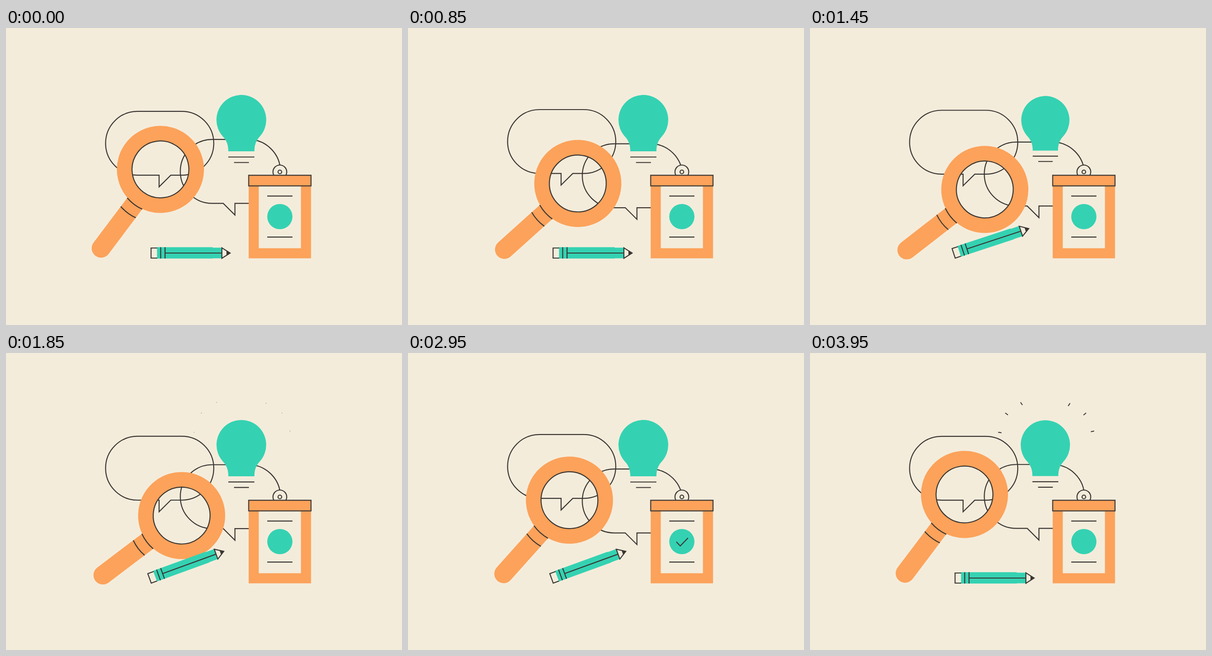
Recreate the animation shown at these times as an HTML page. Size 864 by 648 pixels, loop 4000 ms.

```html
<!DOCTYPE html>
<html lang="en">
<head>
<meta charset="utf-8">
<title>Research tools</title>
<style>
  html, body { margin: 0; width: 100%; height: 100%; overflow: hidden; background: #f4ecdb; }
  svg { display: block; width: 864px; height: 648px; }
  .line { fill: none; stroke: #3a3633; stroke-width: 2.2; }
  .ink { fill: #3a3633; }
  .paper { fill: #f4ecdb; }
  .orange { fill: #fca25a; }
  .teal { fill: #34d2b2; }
</style>
</head>
<body>
<svg viewBox="0 0 864 648">
  <rect class="paper" width="864" height="648"/>

  <path id="bubbleLeft" class="line" d="M287 181.8H383.6A69.7 69.7 0 0 1 383.6 321.2H359.5L334 346.5V321.2H287A69.7 69.7 0 0 1 287 181.8Z"/>
  <path id="bubbleRight" class="line" d="M450 243.2H529A69.7 69.7 0 0 1 529 382.6H499.5V408L474 382.6H450A69.7 69.7 0 0 1 450 243.2Z"/>

  <g id="bulb">
    <path class="teal" d="M473 236.5A54.3 54.3 0 1 1 554 236.5C546 245 542 254 542 269H485C485 254 481 245 473 236.5Z"/>
    <path class="line" d="M485 281.5H542M497.5 293.5H530"/>
  </g>
  <g id="rays"></g>

  <g id="clipboard">
    <rect class="orange" x="529.5" y="335" width="136" height="167.5"/>
    <rect class="paper" x="551.5" y="340" width="92" height="140.5"/>
    <circle class="line" cx="597.5" cy="314" r="15" style="fill:#f4ecdb"/>
    <circle class="line" cx="597.5" cy="314" r="4"/>
    <rect class="line" x="529.5" y="321.3" width="136" height="23.2" style="fill:#fca25a"/>
    <path class="line" d="M570 366.6H625M570 456.2H625"/>
    <circle class="teal" cx="597.5" cy="411.5" r="27.5"/>
    <path id="check" class="line" pathLength="1" d="M585.5 412L594 421L611 403.5"/>
  </g>

  <!-- Local x axis runs from the pivot along the handle to the lens. -->
  <g id="magnifier">
    <path class="orange" d="M20 -20.5H146V20.5H20A20.5 20.5 0 0 1 20 -20.5Z"/>
    <circle cx="235.4" r="78.5" fill="none" stroke="#fca25a" stroke-width="33"/>
    <circle class="line" cx="235.4" r="62"/>
    <path class="line" d="M142.2 -20.5A95.4 95.4 0 0 0 142.2 20.5M118.7 -20.5A95.4 95.4 0 0 0 118.7 20.5"/>
  </g>

  <g id="pencil">
    <path class="teal" d="M329.5 478.3H451V479.2H471V502.4H451V503H329.5Z"/>
    <path class="line" d="M330 480H316.5V502H330M337.5 478.3V503M347 478.3V503M347 491H471M471 479.6L489 491L471 502.4Z"/>
    <path class="ink" d="M481 485.8L490 491L481 496.2Z"/>
  </g>
</svg>
<script>
  const LOOP = 4000;
  const BURST_GAP = 2160;
  const RAY_LENGTH = 25;
  // Outer end of each ray and its inward direction in degrees.
  const rays = [
    [410.5, 173, 7], [426, 130.8, 37], [459.3, 107.5, 55],
    [567.4, 109.5, 124], [602.4, 130.8, 141], [620, 170.3, 169]
  ];

  const byId = id => document.getElementById(id);
  const progress = (t, from, to) => Math.min(1, Math.max(0, (t - from) / (to - from)));
  const smooth = (t, from, to) => {
    const x = progress(t, from, to);
    return x * x * (3 - 2 * x);
  };

  // Cubic bezier (.333, 0, .2, 1), solved by bisection.
  function settle(t, from, to) {
    const x = progress(t, from, to);
    let low = 0, high = 1;
    for (let i = 0; i < 24; i++) {
      const s = (low + high) / 2, r = 1 - s;
      if (r * r * s + 0.6 * r * s * s + s * s * s < x) low = s;
      else high = s;
    }
    return low * low * (3 - 2 * low);
  }

  const rayPaths = rays.map(() => {
    const path = document.createElementNS("http://www.w3.org/2000/svg", "path");
    path.setAttribute("class", "line");
    path.style.strokeWidth = 2;
    byId("rays").append(path);
    return path;
  });

  const transform = (id, value) => byId(id).setAttribute("transform", value);

  function drawRays(t) {
    const tip = RAY_LENGTH * (1 - smooth(t, 1580, 1760));
    const tail = RAY_LENGTH * (1 - smooth(t, 1650, 1870));
    const visible = tail - tip > 0.05;
    rays.forEach(([x, y, degrees], i) => {
      const a = degrees * Math.PI / 180;
      const at = d => `${x + d * Math.cos(a)} ${y + d * Math.sin(a)}`;
      rayPaths[i].setAttribute("d", visible ? `M${at(tip)}L${at(tail)}` : "");
    });
  }

  function render(t) {
    const sway = (1 - Math.cos(t / 1000 * Math.PI)) / 2;
    transform("bubbleLeft", `translate(0 ${-4 * sway})`);
    transform("bubbleRight", `translate(0 ${10 * sway})`);

    const swing = settle(t, 0, 2000) - settle(t, 2100, 4080);
    transform("magnifier", `translate(195.4 496.6) rotate(${16 * swing - 53.03})`);

    const lift = settle(t, 1020, 1690) - settle(t, 3200, 3860);
    transform("pencil", `rotate(${-20 * lift} 316.8 501)`);

    const burst = t < 1220 + BURST_GAP ? t : t - BURST_GAP;
    const scale = 1 - 0.04 * (smooth(burst, 1220, 1550) - smooth(burst, 1550, 1900));
    transform("bulb", `translate(513.5 220) scale(${scale}) translate(-513.5 -220)`);
    drawRays(burst);

    const drawn = smooth(t, 2200, 2500) - smooth(t, 3400, 3700);
    const check = byId("check");
    check.style.visibility = drawn > 0.001 ? "visible" : "hidden";
    check.setAttribute("stroke-dasharray", `${drawn} 2`);
  }

  const start = performance.now();
  function frame(now) {
    render(Math.max(0, now - start) % LOOP);
    requestAnimationFrame(frame);
  }
  render(0);
  requestAnimationFrame(frame);
</script>
</body>
</html>
```
